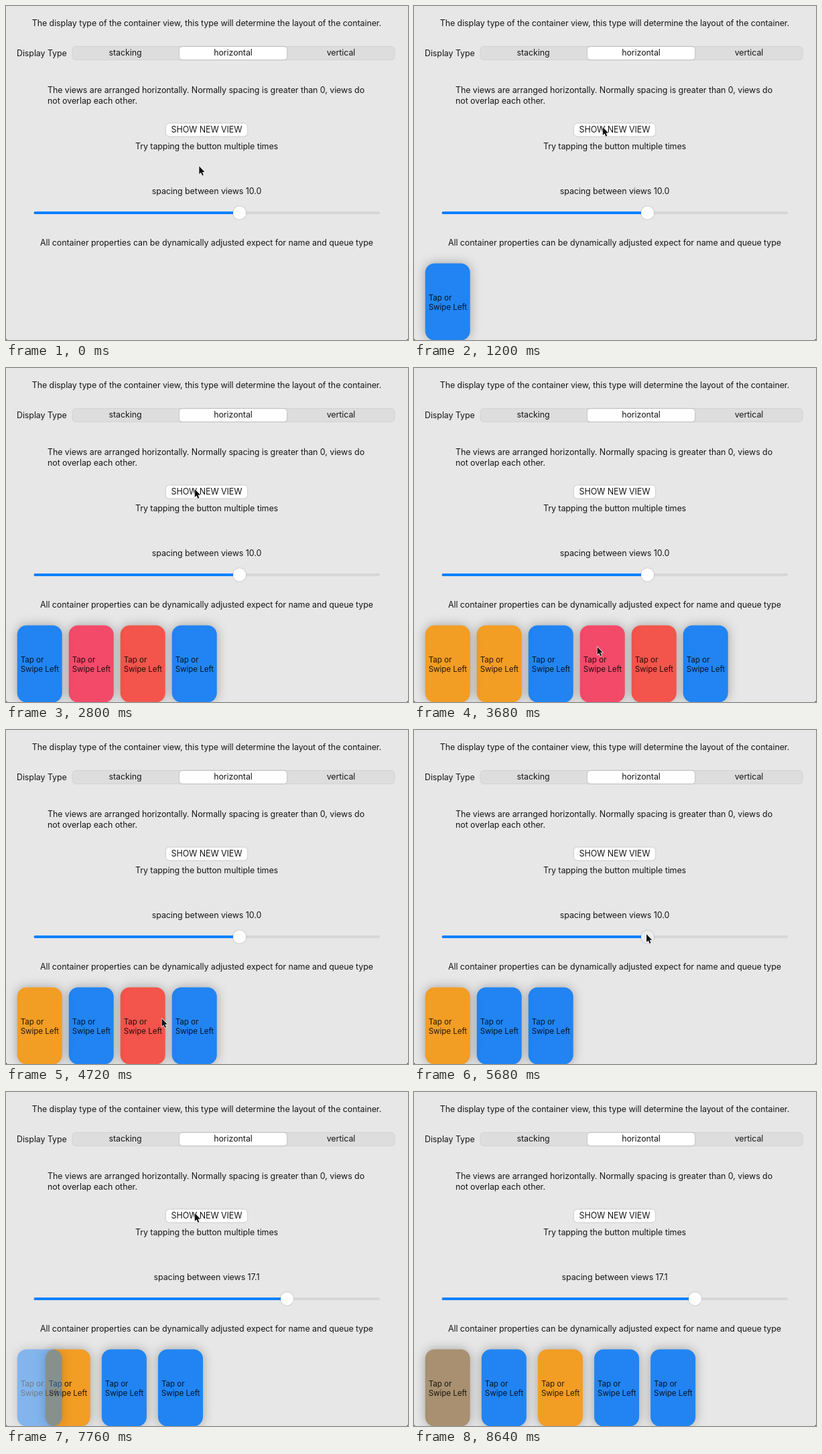
Animation, 600 px wide and 499 px high, one loop 9520 ms. Source, as an HTML page:

```html
<!DOCTYPE html>
<html lang="en">
<head>
<meta charset="utf-8">
<title>Container view demo</title>
<style>
  html, body { margin: 0; width: 100%; height: 100%; overflow: hidden; background: #e7e7e7; }
  svg { display: block; width: 600px; height: 499px; }
  text { font: 12.4px Inter, "Open Sans", sans-serif; letter-spacing: -.045px; fill: #161616; }
  .mid { text-anchor: middle; }
  .card text { font-size: 11.6px; fill: #000; fill-opacity: .85; }
  .card .body { filter: drop-shadow(0 0 8px rgba(0, 0, 0, .3)); }
  .raised { filter: drop-shadow(0 .5px .8px rgba(0, 0, 0, .24)); }
</style>
</head>
<body>
<svg viewBox="0 0 600 499">
  <rect width="600" height="499" fill="#e7e7e7"/>
  <text class="mid" x="299.5" y="30">The display type of the container view, this type will determine the layout of the container.</text>

  <text x="16" y="75">Display Type</text>
  <rect x="99" y="60.5" width="481" height="20" rx="5" fill="#dddddd" stroke="#d2d2d2"/>
  <rect class="raised" x="259" y="61" width="160" height="19" rx="4.5" fill="#fff"/>
  <text class="mid" x="178" y="74.3">stacking</text>
  <text class="mid" x="339" y="74.3">horizontal</text>
  <text class="mid" x="500" y="74.3">vertical</text>

  <text x="62" y="130.3">The views are arranged horizontally. Normally spacing is greater than 0, views do</text>
  <text x="62" y="145.8">not overlap each other.</text>

  <rect id="button" class="raised" x="239" y="175.5" width="121" height="19" rx="5" fill="#fff"/>
  <text class="mid" x="299.5" y="189.2">SHOW NEW VIEW</text>
  <text class="mid" x="299.5" y="213.7">Try tapping the button multiple times</text>

  <text id="label" class="mid" x="299.5" y="281">spacing between views 10.0</text>
  <rect x="41.5" y="307" width="516.5" height="4" rx="2" fill="#d6d6d6"/>
  <rect id="fill" x="41.5" y="307" width="307" height="4" rx="2" fill="#0a80ff"/>
  <circle id="knob" class="raised" cx="348.5" cy="309" r="9.7" fill="#fff"/>

  <text class="mid" x="299.5" y="358">All container properties can be dynamically adjusted expect for name and queue type</text>

  <g id="cards"></g>
  <path d="M0 496V499H3Q0 499 0 496ZM600 496V499H597Q600 499 600 496Z" fill="#333"/>
  <path id="cursor" d="M0 0V12L2.7 9.5 4.6 13.9 6.5 13.1 4.7 8.8H8.3Z" fill="#111" stroke="#fff" stroke-width="1.4" paint-order="stroke" stroke-linejoin="round"/>
</svg>
<script>
const LOOP = 9520, STEP = 80, FADE = 320, CARD_W = 67, LEFT = 16.7;
const RED = '#f3544b', BLUE = '#2184f2', PINK = '#f34a69', ORANGE = '#f29d24', BROWN = '#a89070';

// Oldest first; newer cards push older ones to the right.
const cards = [
  { color: BLUE, born: 880 },
  { color: RED, born: 1360, gone: 4720 },
  { color: PINK, born: 2000, gone: 3760 },
  { color: BLUE, born: 2400 },
  { color: ORANGE, born: 2800, gone: 4240 },
  { color: ORANGE, born: 3120 },
  { color: BLUE, born: 7600 },
  { color: BROWN, born: 8160 }
];

// Rows of time followed by values.
const cursorPath = [
  [80, 288.3, 239.3], [720, 281.8, 181], [3280, 281.8, 181], [3680, 273.5, 416.5], [3840, 273.5, 416.5],
  [4160, 127, 430], [4320, 127, 430], [4640, 232.5, 431], [4880, 232.5, 431], [5440, 347, 305],
  [5680, 347, 305], [6560, 416.3, 305], [6800, 419, 305], [6960, 419, 305], [7440, 281.8, 181]
];
const sliderPath = [[5680, 348.5, 10], [6560, 416.5, 16.4], [6800, 419.5, 17.1]];

const $ = id => document.getElementById(id);
const set = (el, attrs) => { for (const k in attrs) el.setAttribute(k, attrs[k]); };
const ease = p => { p = Math.min(1, Math.max(0, p)); return p * p * (3 - 2 * p); };

function along(path, t) {
  const next = path.findIndex(row => row[0] > t);
  if (next === 0) return path[0].slice(1);
  if (next < 0) return path[path.length - 1].slice(1);
  const a = path[next - 1], b = path[next];
  const p = ease((t - a[0]) / (b[0] - a[0]));
  return a.slice(1).map((v, i) => v + (b[i + 1] - v) * p);
}

function presence({ born, gone = Infinity }, t) {
  return ease((t - born) / FADE) * (1 - ease((t - gone) / FADE));
}

for (const card of cards) {
  card.el = document.createElementNS('http://www.w3.org/2000/svg', 'g');
  card.el.setAttribute('class', 'card');
  card.el.innerHTML = `<rect class="body" y="384.5" width="${CARD_W}" height="115" rx="14" fill="${card.color}"/>
    <text x="5" y="439.5">Tap or</text><text x="5" y="454">Swipe Left</text>`;
  $('cards').append(card.el);
}

function draw(t) {
  const [x, y] = along(cursorPath, t);
  set($('cursor'), { transform: `translate(${x} ${y})`, visibility: t < 8560 ? 'visible' : 'hidden' });

  const [knob, spacing] = along(sliderPath, t);
  set($('knob'), { cx: knob, fill: t >= 5600 && t < 6880 ? '#ececec' : '#fff' });
  set($('fill'), { width: knob - 41.5 });
  $('label').textContent = 'spacing between views ' + spacing.toFixed(1);

  const pressed = cards.some(c => t >= c.born - STEP && t < c.born);
  set($('button'), { fill: pressed ? '#f0f0f0' : '#fff' });

  let slot = 0;
  for (const card of [...cards].reverse()) {
    const shown = presence(card, t);
    set(card.el, {
      transform: `translate(${LEFT + slot * (CARD_W + spacing)} 0)`,
      opacity: shown,
      visibility: shown ? 'visible' : 'hidden'
    });
    slot += shown;
  }
}

const start = performance.now();
function tick() {
  const t = (performance.now() - start) % LOOP;
  draw(Math.floor(t / STEP) * STEP);
  requestAnimationFrame(tick);
}
tick();
</script>
</body>
</html>
```
